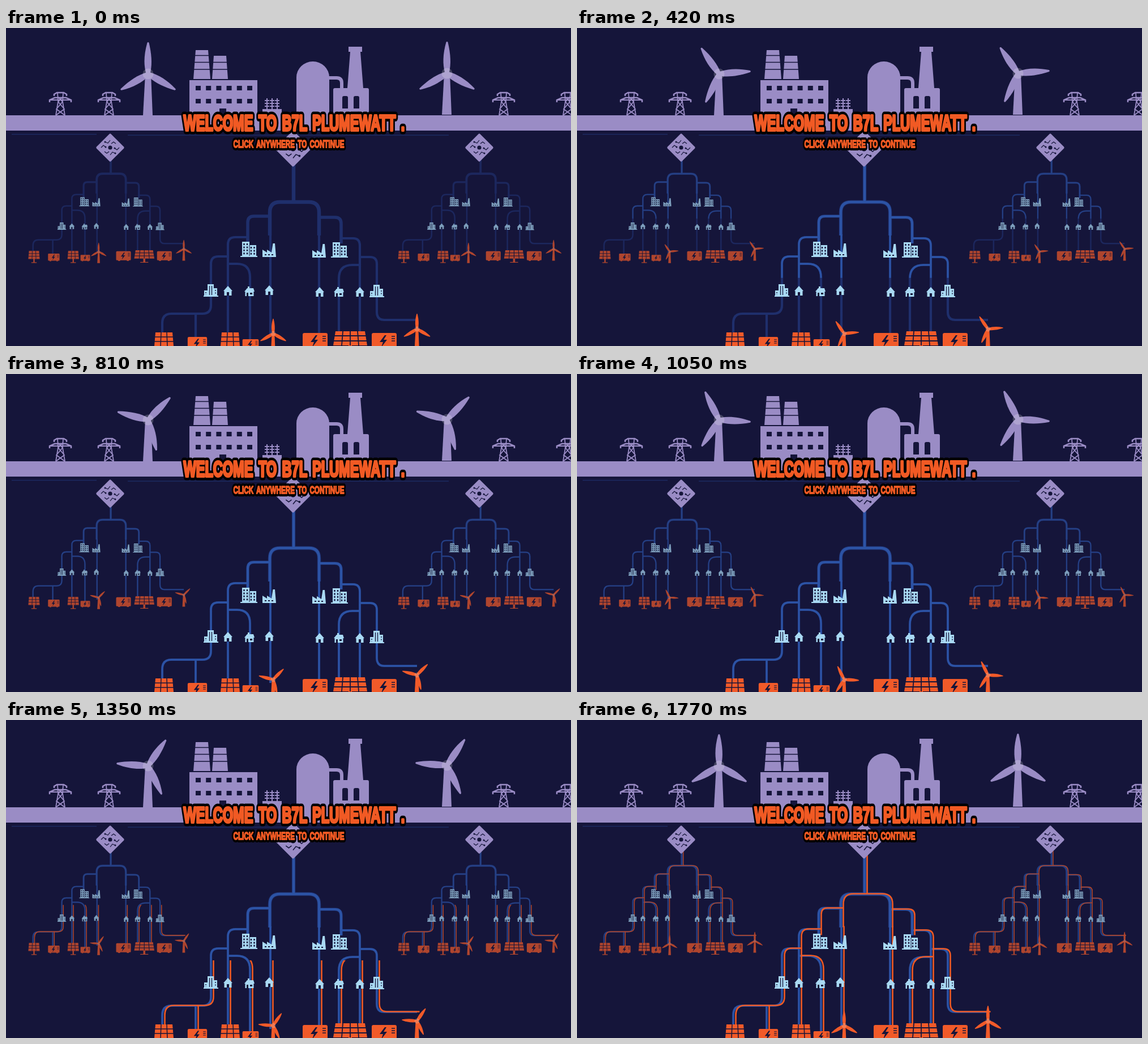
Write an HTML page that moves like this. It is 998 px wide and 561 px high and loops after 1.8 s.

```html
<!DOCTYPE html>
<html lang="en">
<head>
<meta charset="utf-8">
<title>Smart grid</title>
<style>
  html, body { margin: 0; width: 100%; height: 100%; overflow: hidden; background: #15153a; }
  svg { display: block; width: 100vw; height: 100vh; }
  text { font-family: "Liberation Sans", Arial, sans-serif; font-weight: bold; }
  .cut { fill: #15153a; }
  .line { fill: none; stroke: #15153a; }
  .main { stroke-width: var(--main); }
  .branch { stroke-width: var(--branch); }
  .leaf { stroke-width: var(--leaf); }
  .idle { stroke: #1f2f6c; --main: 6.5px; --branch: 5.5px; --leaf: 4.2px; }
  .live { stroke: #2c53a5; --main: 4.6px; --branch: 4.2px; --leaf: 3.4px; }
  .back { stroke: #f15a24; --main: 2.6px; --branch: 2.6px; --leaf: 2.6px; }
</style>
</head>
<body>
<svg viewBox="0 0 998 561">
  <defs>
    <clipPath id="powered"><rect id="poweredArea" width="998" height="0"/></clipPath>
    <clipPath id="returned"><rect id="returnedArea" width="998" height="700"/></clipPath>

    <g id="blades">
      <path id="blade" d="M-3.500 0C-8 -16 -7.500 -34 -1.500 -55Q0 -57 1.500 -55C6.500 -34 7.500 -16 3.500 0Z"/>
      <use href="#blade" transform="rotate(120)"/>
      <use href="#blade" transform="rotate(240)"/>
    </g>
    <g id="turbine">
      <path d="M-5 0H5L8 73H-9Z"/>
      <g class="rotor"><use href="#blades"/></g>
      <circle r="9.5" fill="#fff" fill-opacity=".2"/>
    </g>

    <g id="pylon" fill="none" stroke="#9a8cc5" stroke-width="1.8">
      <path d="M-5 114L-4 130L-8 154M5 114L4 130L8 154M-4 130L7 143L-8 154M4 130L-7 143L8 154M-5 121L4 130M5 121L-4 130"/>
      <path d="M-11 120V117L-6 114H6L11 117V120M-19 131V127L-10 123H10L19 127V131" stroke-width="2.5"/>
      <path d="M-19 127H19"/>
    </g>

    <g id="hub">
      <rect x="-18" y="-18" width="36" height="36" rx="2" transform="rotate(45)" fill="#9a8cc5"/>
      <circle r="3.6" class="cut"/>
      <g id="traces">
        <path class="line" stroke-width="1.2" d="M-16 0L-12 -4L-8 -1M-9 -10L-4 -8L0 -13M-10 7L-6 10L-2 7"/>
        <path class="cut" d="M-9.500 -1a1.500 1.500 0 1 0 3 0a1.500 1.500 0 1 0 -3 0M-10.500 -10a1.500 1.500 0 1 0 3 0a1.500 1.500 0 1 0 -3 0"/>
      </g>
      <use href="#traces" transform="rotate(180)"/>
    </g>

    <g id="offices">
      <path d="M-12 -13H1V-7H13V12H15V14H-15V12H-12Z"/>
      <path class="line" stroke-width="2.4" stroke-dasharray="3 2.4" d="M-8.500 -10V11M-3 -10V11M4 -4V11M9.500 -4V11"/>
      <path class="line" d="M1 -7V12"/>
    </g>
    <g id="factory">
      <path d="M-12 11V-2L-4 3V-2L4 3L6.500 -13H10L12 11Z"/>
      <path class="line" stroke-width="2" stroke-dasharray="3 3" d="M-8 7H8"/>
    </g>
    <g id="town">
      <path d="M-12 9V0H-6V-11H5V-4H11V9H13V11H-13V9Z"/>
      <path class="line" stroke-width="1.3" d="M-2.500 -8V8M1.500 -8V8"/>
      <path class="line" stroke-width="1.500" stroke-dasharray="2 2.500" d="M8 -1V8M-9 3V8"/>
    </g>
    <g id="house">
      <path d="M-8 0L0 -9L8 0H6.500V8H-6.500V0Z"/>
      <path class="cut" d="M-2 8V2H2V8Z"/>
    </g>
    <g id="cottage">
      <path d="M-9 0L-4 -6H-3V-9H0V-6H7L9 0H7.500V8H-7.500V0Z"/>
      <path class="cut" d="M-5 8V2H-2V8ZM1 2H5V5H1Z"/>
    </g>

    <g id="panel">
      <path d="M-15 -13H15L17 11H-17ZM-2 11H2V21H8V23H-8V21H-2Z"/>
      <path class="line" stroke-width="1.5" d="M-5 -13L-6 11M5 -13L6 11M-16 -5H16M-17 3H17"/>
    </g>
    <g id="widePanel">
      <path d="M-26 -14H26L30 11H-30ZM-3 11H3V21H12V23H-12V21H-3Z"/>
      <path class="line" stroke-width="1.8" d="M-13 -14L-15 11M0 -14V11M13 -14L15 11M-28 -6H28M-29 3H29"/>
    </g>
    <g id="battery">
      <path d="M-19 -14H19Q22 -14 22 -11V11Q22 13 19 13H16V15H10V13H-10V15H-16V13H-19Q-22 13 -22 11V-11Q-22 -14 -19 -14Z"/>
      <path class="cut" d="M1 -10L-8 2H-2L-5 11L5 -2H-1L4 -10Z"/>
      <path class="line" stroke-width="1.3" d="M13 -8H19M13 -4H19M13 0H19"/>
    </g>

    <g id="wires" fill="none">
      <path class="main" d="M508 232V307M466 366V325Q466 307 484 307H535Q553 307 553 325V366"/>
      <path class="branch" d="M466 332H438Q427 332 427 343V380M553 334H581Q592 334 592 345V380"/>
      <path class="leaf" d="M467 364V545M553 364V545
        M427 369H405Q392 369 392 382V545M592 371H613Q625 371 625 384V545
        M392 403H375Q362 403 362 416V489Q362 504 347 504H292Q276 504 276 521V545M335 504V550
        M392 416H408Q431 416 431 440V552
        M625 404H643Q655 404 655 416V501Q655 515 668 515H726
        M625 418H612Q588 418 588 442V545"/>
    </g>

    <g id="grid">
      <use href="#wires" class="idle"/>
      <g clip-path="url(#powered)"><use href="#wires" class="live"/></g>
      <g clip-path="url(#returned)"><use href="#wires" class="back" transform="translate(4.500 -.5)"/></g>
      <g fill="#a9d9f3">
        <use href="#offices" x="429" y="390"/><use href="#offices" x="589" y="391"/>
        <use href="#factory" x="465" y="393"/><use href="#factory" x="553" y="394"/>
        <use href="#town" x="362" y="463"/><use href="#town" x="655" y="464"/>
        <use href="#house" x="392" y="464"/><use href="#house" x="465" y="463"/>
        <use href="#house" x="554" y="466"/><use href="#house" x="625" y="466"/>
        <use href="#cottage" x="430" y="465"/><use href="#cottage" x="588" y="466"/>
      </g>
      <g fill="#f15a29">
        <use href="#panel" x="279" y="550"/><use href="#panel" x="396" y="550"/>
        <use href="#widePanel" x="608" y="549"/>
        <use href="#battery" transform="translate(338 556) scale(.78)"/>
        <use href="#battery" transform="translate(432 558) scale(.65)"/>
        <use href="#battery" x="546" y="552"/><use href="#battery" x="668" y="552"/>
        <use href="#turbine" transform="translate(472 539) scale(.47)"/>
        <use href="#turbine" transform="translate(726 531) scale(.48)"/>
      </g>
    </g>

    <text id="title" font-size="39" letter-spacing="-.3" word-spacing="5" transform="translate(313.500 181) scale(.61 1)">WELCOME TO B7L PLUMEWATT .</text>
    <text id="prompt" font-size="18.500" word-spacing="3" transform="translate(401.500 211) scale(.632 1)">CLICK ANYWHERE TO CONTINUE</text>
  </defs>

  <rect width="998" height="561" class="cut"/>
  <path d="M10 187.500H160M215 189H782" stroke="#1d2b62" stroke-width="1.5"/>

  <g fill="#9a8cc5">
    <rect y="154" width="998" height="27"/>
    <use href="#pylon" x="96"/><use href="#pylon" x="182"/>
    <use href="#pylon" x="879"/><use href="#pylon" x="992"/>
    <use href="#turbine" x="251" y="81"/><use href="#turbine" x="779" y="80"/>

    <path d="M335 39H357L361 90H331ZM367 49H389L392 90H364ZM324 92H444V154H324Z"/>
    <path class="line" stroke-width="1.700" d="M330 48.500H362M330 60.500H393M330 73H393"/>
    <path class="line" stroke-width="8" stroke-dasharray="9 9.200" d="M335 106H436M335 129H436"/>
    <rect x="377" y="142" width="12" height="12" class="cut"/>

    <path d="M453 143H487V154H453Z"/>
    <path fill="none" stroke="#9a8cc5" stroke-width="2"
      d="M461 124V144M470 124V144M479 124V144M457 128H465M466 128H474M475 128H483M457 133H465M466 133H474M475 133H483M457 138H465M466 138H474M475 138H483"/>

    <path d="M513 154V87A29 28 0 0 1 571 87V154ZM605 33H629V42H626L631 106H638Q641 106 641 109V154H578V109Q578 106 581 106H603L608 42H605Z"/>
    <path fill="none" stroke="#9a8cc5" stroke-width="6" d="M570 88H584Q593 88 593 97V108"/>
    <path class="cut" d="M594 123Q594 120 597 120H601Q604 120 604 123V142H594ZM614 123Q614 120 617 120H621Q624 120 624 123V142H614Z"/>
  </g>

  <use href="#grid"/>
  <use href="#grid" opacity=".7" transform="translate(-115.700 75.300) scale(.592)"/>
  <use href="#grid" opacity=".7" transform="translate(537.500 75.300) scale(.592)"/>
  <use href="#hub" transform="translate(184 211)"/>
  <use href="#hub" transform="translate(836 211)"/>
  <use href="#hub" transform="translate(507 213) scale(1.270)"/>

  <g stroke-linejoin="round">
    <use href="#title" stroke="#000" stroke-width="13"/>
    <use href="#prompt" stroke="#000" stroke-width="10"/>
    <use href="#title" fill="#f15a24" stroke="#f15a24" stroke-width="4"/>
    <use href="#prompt" fill="#f15a24" stroke="#f15a24" stroke-width="1.800"/>
  </g>
</svg>
<script>
  const LOOP = 1800, STEP = 30;
  const FLOW = 0.473;   // pixels per ms along the wires
  const SPIN = 0.2033;  // degrees per ms
  const byId = id => document.getElementById(id);
  const rotor = document.querySelector('.rotor');
  const poweredArea = byId('poweredArea');
  const returnedArea = byId('returnedArea');

  function draw(time) {
    const t = Math.floor((time % LOOP) / STEP) * STEP;
    rotor.setAttribute('transform', `rotate(${t * SPIN})`);
    poweredArea.setAttribute('height', 242 + t * FLOW);
    returnedArea.setAttribute('y', t < 1050 ? 700 : 424 - (t - 1350) * FLOW);
  }

  const start = performance.now();
  function tick() {
    draw(performance.now() - start);
    requestAnimationFrame(tick);
  }
  draw(0);
  requestAnimationFrame(tick);
</script>
</body>
</html>
```
